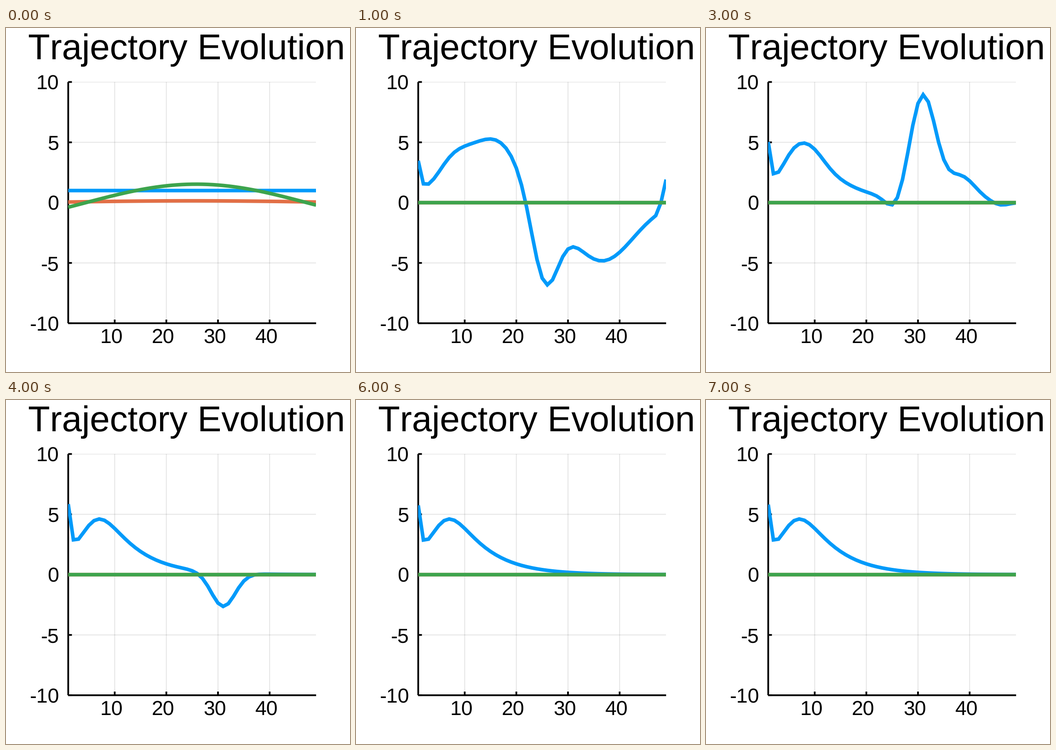
These frames come from a looping animation (748 by 748 pixels, 8 s). A matplotlib script:

```python
import numpy as np
import matplotlib.pyplot as plt
from matplotlib.animation import FuncAnimation
from matplotlib.patches import Rectangle

SIZE, DPI = 748, 100
LEFT, RIGHT, TOP, BOTTOM = 135.3, 674.3, 117.4, 642
BLUE, ORANGE, GREEN = "#009AFA", "#E26F46", "#3DA44D"
TICK_PX, TITLE_PX = 44.5, 78

plt.rcParams["font.family"] = "Liberation Sans"
plt.rcParams["text.kerning_factor"] = 6  # practically disables kerning
plt.rcParams["text.hinting"] = "none"

steps = np.arange(1, 50)


def pt(px):
    return px * 72 / DPI


def px_x(step):
    return LEFT + (step - 1) * (RIGHT - LEFT) / 48


def px_y(value):
    return (TOP + BOTTOM) / 2 - value * (BOTTOM - TOP) / 20


def bump(center, height, width):
    return height * np.exp(-((steps - center) / width) ** 2 / 2)


def control(kick, *bumps):
    """Initial kick and a decaying surge, disturbed by bumps."""
    surge = 19.8 * np.exp(-0.155 * steps) / (1 + np.exp(-0.505 * (steps - 5.42)))
    start = kick * np.exp(-1.8 * (steps - 1))
    return surge + start + sum(bump(*b) for b in bumps)


# The control signal calms down from one iteration to the next.
signals = [
    control(2.55, (4.7, -1.65, 2.9), (16.6, 3.6, 4.4), (25.5, -6.55, 2.5),
            (36.5, -4.9, 6.1), (49, 2.5, 0.67)),
    control(3.0, (4, -1.08, 2.5), (13.4, 2.05, 3.3), (26, -6.15, 2.42),
            (31, -5.2, 2.9), (40.3, 5.5, 3.1), (45.3, 0.9, 1.5),
            (49, -2.6, 0.5)),
    control(3.7, (2.5, -0.42, 2), (9.8, 0.6, 2.3), (25.6, -1.15, 1.7),
            (31, 8.72, 2.5), (38.3, 2.1, 2.8), (46, -0.25, 1.5)),
    control(4.2, (31, -2.8, 2.3)),
    control(4.06, (2.5, -0.08, 2), (11, 0.08, 3), (32.4, -0.66, 1.5),
            (36, -0.17, 2)),
    control(4.1),
    control(4.16),
]

flat = np.zeros(49)
initial = (np.ones(49),
           0.05 + 0.1 * np.sin(np.pi * (steps - 1) / 48),
           1.53 * np.cos(0.0735 * (steps - 25.8)))
states = [initial] + [(signal, flat, flat) for signal in signals]

fig = plt.figure(figsize=(SIZE / DPI, SIZE / DPI), dpi=DPI, facecolor="white")
ax = fig.add_axes([0, 0, 1, 1])
ax.set_xlim(0, SIZE)
ax.set_ylim(SIZE, 0)
ax.axis("off")
plot_box = Rectangle((LEFT, TOP), RIGHT - LEFT, BOTTOM - TOP,
                     transform=ax.transData)


def stroke(xs, ys, width, color="black", clip=False, **kw):
    line, = ax.plot(xs, ys, color=color, lw=pt(width), snap=False,
                    solid_capstyle="butt", solid_joinstyle="miter", **kw)
    if clip:
        line.set_clip_path(plot_box)
    return line


def label(x, baseline, text, px):
    ax.text(x, baseline, text, fontsize=pt(px), ha="left", va="baseline")


def advance(text):
    return TICK_PX * sum(0.333 if c == "-" else 0.556 for c in text)


for step in range(10, 50, 10):
    x, text = px_x(step), str(step)
    stroke([x, x], [TOP, BOTTOM], 2, alpha=0.1, clip=True, zorder=1)
    stroke([x, x], [BOTTOM, BOTTOM - 8], 3.8, zorder=2)
    label(x - 7 - advance(text) / 2, 685.5, text, TICK_PX)

for value in range(-10, 11, 5):
    y, text = px_y(value), str(value)
    stroke([LEFT, RIGHT], [y, y], 2, alpha=0.1, clip=True, zorder=1)
    stroke([LEFT, LEFT + 8], [y, y], 3.8, zorder=2)
    label(115 - advance(text), y + 16.3, text, TICK_PX)

stroke([LEFT, LEFT], [TOP, BOTTOM], 3.8, zorder=2)
stroke([LEFT, RIGHT], [BOTTOM, BOTTOM], 3.8, zorder=2)
label(48.4, 68, "Trajectory Evolution", TITLE_PX)

curves = [stroke(px_x(steps), px_y(flat), 7.8, color, clip=True, zorder=3)
          for color in (BLUE, ORANGE, GREEN)]


def update(i):
    for curve, values in zip(curves, states[i]):
        curve.set_ydata(px_y(values))
    return curves


anim = FuncAnimation(fig, update, frames=len(states), interval=1000,
                     repeat=True, repeat_delay=0)
plt.show()
```
